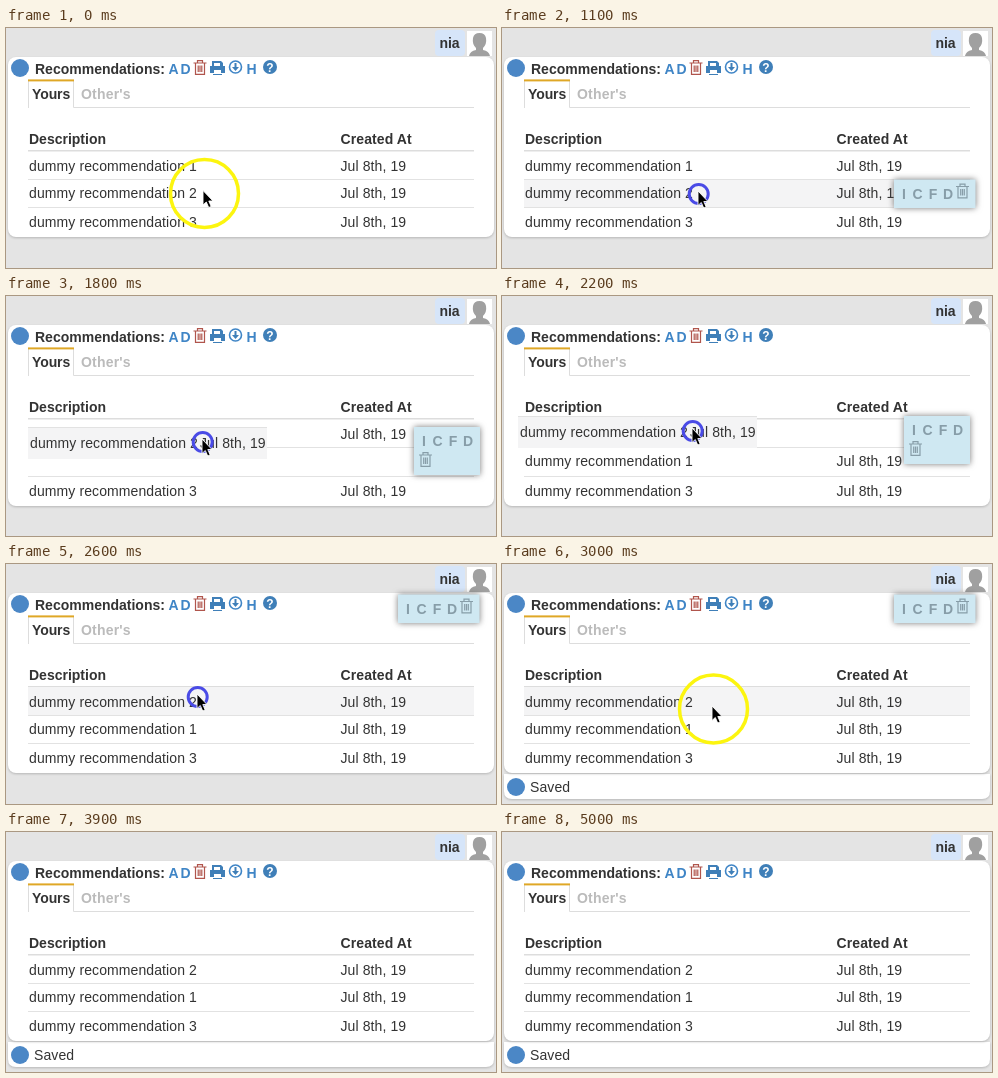
An HTML page that plays this animation: 490 px wide and 240 px high, repeating every 6 s.

```html
<!DOCTYPE html>
<html lang="en">
<head>
<meta charset="utf-8">
<title>Reordering recommendations</title>
<style>
  html, body { margin: 0; width: 100%; height: 100%; overflow: hidden; background: #e4e4e4; }
  svg { display: block; width: 490px; height: 240px; }
  text { font: 14px "Liberation Sans", Arial, sans-serif; fill: #333; letter-spacing: .1px; }
  .bold { font-weight: bold; letter-spacing: 0; }
  .blue { font-weight: bold; fill: #3f85c6; }
  .muted { font-weight: bold; fill: #bbb; letter-spacing: .2px; }
  .line { fill: #e2e2e2; }
  .hover { fill: #f4f4f5; }
  .panel { fill: #fff; filter: drop-shadow(0 1px 1px #0003); }
  #menu text { font-weight: bold; fill: #879da8; text-anchor: middle; }
  #menu rect { fill: #cfe8f2; filter: drop-shadow(0 0 3px #555c); }
</style>
</head>
<body>
<svg viewBox="0 0 490 240">
  <defs>
    <g id="trash" fill="none" stroke="currentColor" stroke-width="1.2">
      <path d="M0 3H13M4 3V.7H9V3M2 3V14.3H11V3M4.7 5.5V12M6.5 5.5V12M8.3 5.5V12"/>
    </g>
  </defs>

  <rect x="429" y="2" width="30" height="26" rx="4" fill="#d6e5f9"/>
  <text class="bold" x="443.500" y="20" text-anchor="middle">nia</text>
  <rect x="461" y="3" width="25" height="25" fill="#fff"/>
  <path d="M463 28Q464 23 470 22V20Q466 16 467 10Q468 5 473.500 5T480 10Q481 16 477 20V22Q483 23 484 28Z" fill="#a0a0a0"/>

  <g id="saved">
    <path class="panel" d="M2 210H488V227Q488 235 480 235H10Q2 235 2 227Z"/>
    <circle cx="14" cy="223" r="9" fill="#4b87c6"/>
    <text x="28" y="228">Saved</text>
  </g>
  <rect id="card" class="panel" x="2" y="29" width="486" height="180" rx="8"/>

  <circle cx="14" cy="40" r="9" fill="#4b87c6"/>
  <text class="bold" x="29" y="46">Recommendations:</text>
  <text class="blue" x="162.500" y="46">A</text>
  <text class="blue" x="174.500" y="46">D</text>
  <use href="#trash" x="187.500" y="32" color="#b0554c"/>
  <g fill="#3f7fb8">
    <path d="M206 33H215L217 35V38H206ZM204 38H219V45H204Z"/>
    <path d="M208 35H214V38H208ZM208 42H215V46H208Z" fill="#fff"/>
    <path d="M207 46H216V47H207Z"/>
    <circle cx="229.500" cy="39" r="6" fill="none" stroke="#3f85c6" stroke-width="1.600"/>
    <path d="M228.500 35H230.500V39H233L229.500 43L226 39H228.500Z"/>
    <circle cx="264" cy="39" r="7"/>
  </g>
  <text class="blue" x="240.500" y="46">H</text>
  <text x="264" y="43.500" text-anchor="middle" style="font-size:12px;font-weight:bold;fill:#fff">?</text>

  <path d="M22.500 80V52M67.500 52V79.500H468" fill="none" stroke="#ddd"/>
  <rect x="22" y="51.400" width="46" height="2" fill="#dfa726"/>
  <text class="bold" x="26" y="71" style="letter-spacing:-.1px">Yours</text>
  <text class="muted" x="75" y="71">Other's</text>

  <text class="bold" x="23" y="116">Description</text>
  <text class="bold" x="334.500" y="116" style="letter-spacing:.1px">Created At</text>
  <rect x="22" y="122" width="446" height="1.500" fill="#ddd"/>
  <rect id="hover" class="hover" x="22" width="446" height="28"/>
  <rect class="line" x="22" y="151" width="446" height="1"/>
  <rect id="divider" class="line" x="22" y="179" width="446" height="1"/>
  <g id="rows"></g>

  <g id="helper">
    <rect class="hover" x="22" y="-16" width="239" height="32"/>
    <rect class="line" x="22" y="-16" width="239" height="1"/>
    <text x="24" y="5">dummy recommendation 2</text>
    <text x="194" y="5">Jul 8th, 19</text>
  </g>

  <g id="menu">
    <rect id="menuBox"/>
    <g id="letters"><text x="10">I</text><text x="23.500">C</text><text x="39">F</text><text x="54">D</text></g>
    <use id="menuTrash" href="#trash" color="#879da8"/>
  </g>

  <circle id="ring" fill="none"/>
  <path id="cursor" d="M0 0V14.500L3.300 11.500L5.700 17L8.200 16L5.800 10.500H10Z" fill="#000" stroke="#fff" stroke-width=".9"/>
</svg>
<script>
const $ = id => document.getElementById(id);
const set = (el, attrs) => { for (const key in attrs) el.setAttribute(key, attrs[key]); };
const show = (el, on) => { el.style.display = on ? '' : 'none'; };
const move = (el, x, y) => set(el, { transform: `translate(${x} ${y})` });

const LOOP = 6000, STEP = 100;
const GRAB = 1200, SWAP = 2000, DROP = 2600, RELEASE = 2800, SAVED = 3000, LEAVE = 3900;
const slots = [138, 165, 194], rowTops = [123, 152, 180];

// Pointer tip: time, x, y
const path = [
  [0, 197, 162.5], [1100, 196, 163], [1200, 197, 160], [1500, 198, 150], [1800, 196, 143],
  [2200, 190, 132], [2400, 190, 129], [2600, 191, 130], [2800, 191, 130],
  [3200, 229, 154], [3400, 230.5, 155], [3500, 238, 152], [3900, 268, 238]
];

const rows = [1, 2, 3].map(n => {
  const row = document.createElementNS('http://www.w3.org/2000/svg', 'g');
  row.innerHTML = `<text x="23" y="5">dummy recommendation ${n}</text><text x="334.5" y="5">Jul 8th, 19</text>`;
  return $('rows').appendChild(row);
});

function pointerAt(t) {
  const i = path.findIndex(key => key[0] > t);
  if (i < 0) return path[path.length - 1].slice(1);
  const [t0, x0, y0] = path[i - 1], [t1, x1, y1] = path[i];
  const k = (t - t0) / (t1 - t0);
  return [x0 + (x1 - x0) * k, y0 + (y1 - y0) * k];
}

function drawRing(t, x, y) {
  const pressed = t >= 400 && t < RELEASE;
  const radius = !pressed ? 34 : t < 600 ? 16 : t < 700 ? 13 : 9.5;
  set($('ring'), {
    cx: x + (pressed ? .7 : 1.5), cy: y + 3, r: radius,
    stroke: pressed ? '#4a4be6' : '#fcf50f', 'stroke-width': pressed ? 3 : 3.5
  });
}

function drawMenu(x, y, wrapped) {
  move($('menu'), x, y);
  set($('menuBox'), { width: wrapped ? 66 : 81.5, height: wrapped ? 48 : 28.5 });
  move($('letters'), 0, wrapped ? 19 : 19.5);
  move($('menuTrash'), wrapped ? 5 : 62, wrapped ? 25 : 4);
}

function draw(now) {
  const t = Math.floor(now % LOOP / STEP) * STEP;
  const [x, y] = pointerAt(t);
  const dragging = t >= GRAB && t < DROP, inside = t < LEAVE;
  const order = t < SWAP ? [0, 1, 2] : [1, 0, 2];

  order.forEach((row, slot) => move(rows[row], 0, slots[slot] + (dragging && slot === 2 ? 1 : 0)));
  show(rows[1], !dragging);
  set($('card'), { height: dragging ? 181 : 180 });
  set($('divider'), { y: dragging ? 180 : 179 });

  const hovered = y < 152 ? 0 : y < 180 ? 1 : 2;
  const hovering = inside && t >= 300 && y < 209;
  show($('hover'), hovering && !dragging);
  set($('hover'), { y: rowTops[hovered] });

  show($('helper'), dragging);
  move($('helper'), x - 196, y + 4);
  show($('menu'), hovering);
  if (dragging) drawMenu(x + 212, y - 12, true);
  else drawMenu(392, hovered ? rowTops[hovered] - .5 : 30.5, false);

  show($('saved'), t >= SAVED);
  show($('cursor'), inside);
  show($('ring'), inside);
  move($('cursor'), x, y);
  drawRing(t, x, y);
}

const start = performance.now();
function tick() {
  draw(performance.now() - start);
  requestAnimationFrame(tick);
}
tick();
</script>
</body>
</html>
```
